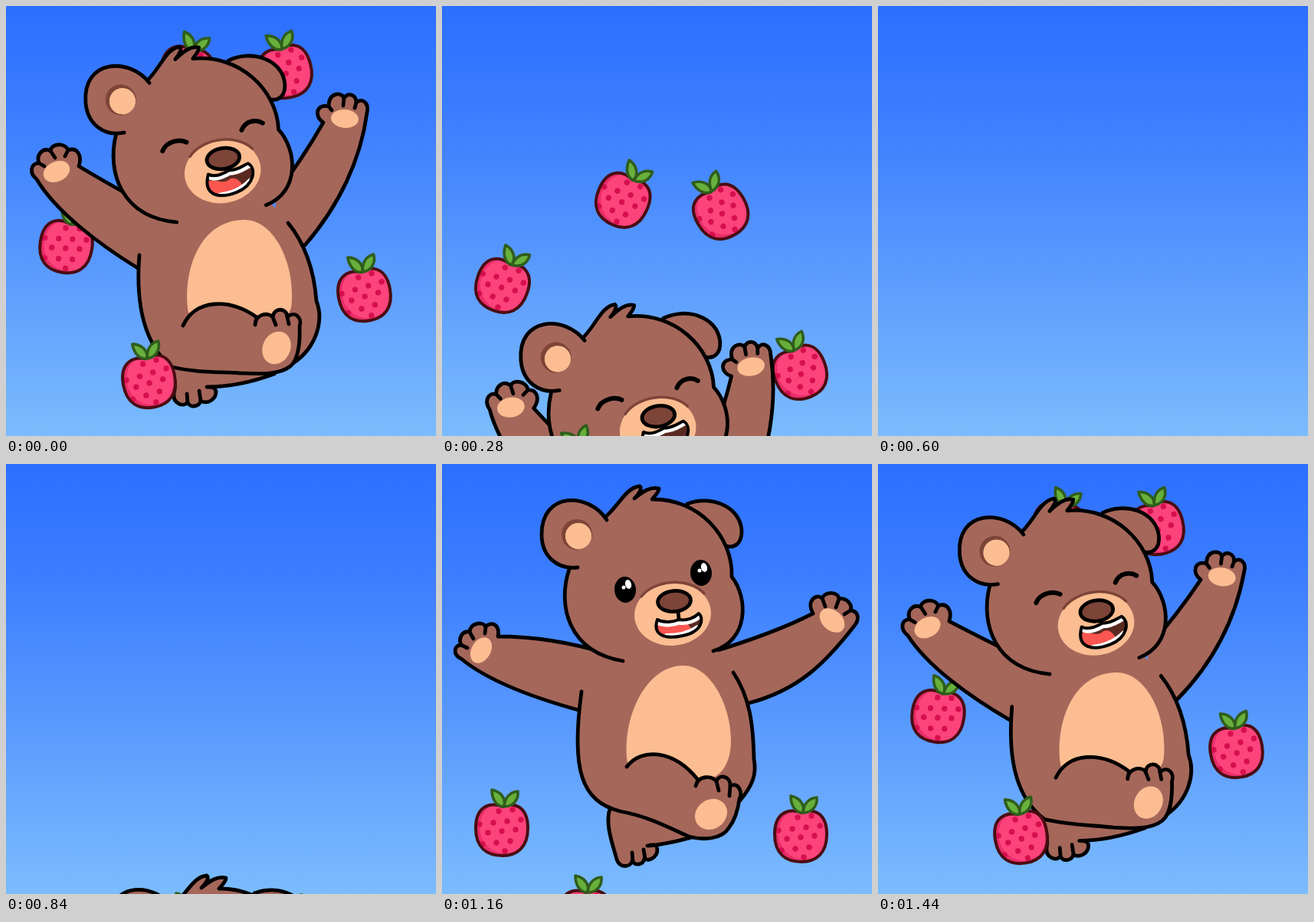
An HTML page with a canvas that plays this animation: 561 px wide and 561 px high, repeating every 1.52 s.

```html
<!DOCTYPE html>
<html lang="en">
<head>
<meta charset="utf-8">
<title>Jumping bear</title>
<style>
html, body { margin: 0; height: 100%; overflow: hidden; }
canvas { display: block; width: 100vw; height: 100vh; }
</style>
</head>
<body>
<canvas id="stage" width="561" height="561"></canvas>
<script>
const g = document.getElementById('stage').getContext('2d');
const LOOP = 1520, STEP = 40;
const FUR = '#a5675a', SKIN = '#fbbd91', DARK = '#7d4438', INK = '#000';
g.lineCap = g.lineJoin = 'round';

const sky = g.createLinearGradient(0, 0, 0, 561);
['#2c6fff', '#3b7dff', '#4f91fe', '#66a6fe', '#7bbcfd']
  .forEach((c, i) => sky.addColorStop(i / 4, c));

// Smooth monotone curve through [time, value] pairs
function curve(...keys) {
  const rate = i => (keys[i + 1][1] - keys[i][1]) / (keys[i + 1][0] - keys[i][0]);
  const last = keys.length - 1;
  const slope = i => {
    if (i === 0) return rate(0);
    if (i === last) return rate(last - 1);
    const a = rate(i - 1), b = rate(i);
    return a * b > 0 ? 2 * a * b / (a + b) : 0;
  };
  return t => {
    if (t <= keys[0][0]) return keys[0][1];
    if (t >= keys[last][0]) return keys[last][1];
    const i = keys.findIndex(k => k[0] > t) - 1;
    const [t0, y0] = keys[i], [t1, y1] = keys[i + 1];
    const h = t1 - t0, u = (t - t0) / h, v = 1 - u;
    return v * v * (1 + 2 * u) * y0 + u * u * (3 - 2 * u) * y1
      + h * u * v * (v * slope(i) - u * slope(i + 1));
  };
}

const bearX = curve([840, 4], [1000, 2], [1160, 0], [1520, 0], [1680, -1]);
const bearY = curve([840, 508], [1000, 234], [1160, 0], [1300, -5], [1440, -5.5],
  [1520, 0], [1680, 107], [1960, 760]);
const poseAt = curve([1160, 0], [1300, .55], [1440, .9], [1520, 1]);
const liftAt = curve([840, -.2], [1000, -.15], [1160, 0], [1520, 0], [1680, .18], [1960, .4]);
const spinAt = curve([1160, 0], [1440, .25], [1520, .27], [1680, .35], [1960, 1], [2120, 1.5]);

const berryPath = (...ys) =>
  curve(...[840, 1000, 1160, 1440, 1520, 1680, 1960, 2120].map((t, i) => [t, ys[i]]));
const berries = [
  { x: 78, spin: 34, y: berryPath(660, 567, 478, 330, 315, 314, 503, 640) },
  { x: 235, spin: 42, y: berryPath(613, 505, 300, 85, 88, 130, 519, 800) },
  { x: 365, spin: -54, y: berryPath(613, 505, 290, 85, 87, 128, 563, 820) },
  { x: 468, spin: -38, y: berryPath(650, 568, 486, 376, 378, 417, 602, 780) },
  { x: 187, spin: -38, y: berryPath(720, 670, 590, 488, 491, 539, 720, 900) }
];

const number = /-?[\d.]+/g;
let pose = 0;
const lerp = (a, b) => a + pose * (b - a);

// Blend two path strings of equal structure by the current pose
function mix([a, b]) {
  const to = b.match(number);
  let i = 0;
  return new Path2D(a.replace(number, v => lerp(+v, +to[i++]).toFixed(2)));
}

function paint(path, fill, line, width = 4.8) {
  const p = typeof path === 'string' ? new Path2D(path) : path;
  if (fill) { g.fillStyle = fill; g.fill(p); }
  if (line) { g.strokeStyle = line; g.lineWidth = width; g.stroke(p); }
}

function oval(x, y, rx, ry, deg, fill, line) {
  const p = new Path2D();
  p.ellipse(x, y, rx, ry, deg * Math.PI / 180, 0, 7);
  paint(p, fill, line);
}

const pad = (a, b) => oval(...a.map((v, i) => lerp(v, b[i])), SKIN);

function turn(x, y, angle) {
  g.translate(x, y);
  g.rotate(angle);
  g.translate(-x, -y);
}

// Each part: open pose, then raised pose
const farLeg = [
  'M219 450C212 470 224 500 228 516C232 528 246 526 248 518C252 524 262 524 264 515C272 520 284 510 280 499C279 497 275 496 268 498C290 497 310 491 330 486L300 440',
  'M214 470C220 480 222 495 219 505C217 519 232 524 237 517C240 525 252 523 254 515C262 520 274 514 274 503C273 498 270 497 262 497C290 497 320 491 350 480L300 440'];
const farToes = ['M248 507L249 519M263 503L265 515', 'M236 506L237 518M252 502L254 515'];
const leftArm = [
  'M215 247C165 232 115 225 73 225C76 211 66 204 57 212C53 205 37 207 36 219C26 217 21 228 25 236C14 237 15 250 25 254C60 283 120 305 178 321L215 300',
  'M190 262C160 247 125 227 95 209C100 194 92 184 81 188C77 178 59 179 58 189C48 184 39 194 43 205C32 205 30 218 40 226C65 268 120 310 172 342L215 320'];
const leftFingers = ['M57 212L56 221M36 219L41 228M25 236L33 240', 'M81 188L77 196M58 189L64 198M43 205L50 209'];
const rightArm = [
  'M350 246C400 231 445 215 484 195C475 180 487 168 496 175C500 166 517 166 518 176C528 174 536 184 533 191C545 192 544 204 538 211C500 260 465 295 400 312L360 310',
  'M352 246C375 215 395 185 414 152C402 145 404 127 421 131C421 112 438 112 441 120C447 112 457 116 457 126C465 119 474 127 471 139C463 200 435 260 390 312L350 310'];
const rightFingers = ['M496 175L500 186M518 176L514 187M533 191L525 196', 'M421 131L425 136M441 120L440 130M457 126L455 133'];
const body = [
  'M182 297C168 400 182 440 232 453L322 486L388 440C405 420 411 405 407 385C406 340 402 305 380 272L345 225L205 225Z',
  'M174 325C168 400 185 445 216 471L305 479L376 465C405 445 415 410 405 385C402 345 390 310 368 283L335 245L190 245Z'];
const flank = [
  'M380 272C402 305 406 340 407 385C411 405 405 420 388 440',
  'M368 283C390 310 402 345 405 385C415 410 405 445 376 465'];
const belly = [
  'M314 263C350 262 377 315 377 360C377 390 365 408 345 412L243 395C232 340 262 264 314 263Z',
  'M310 279C348 278 373 330 373 375C373 400 372 402 350 412L238 400C230 350 250 280 310 279Z'];
const leg = [
  'M241 395C260 370 302 372 334 412L331 420C334 406 352 406 358 414C362 403 377 408 376 420C386 414 393 428 388 437C386 452 382 465 374 475C365 490 340 491 322 486C295 474 270 460 232 453C182 440 168 400 182 297',
  'M231 417C246 383 290 380 327 406L325 416C325 403 341 398 348 406C350 392 367 394 367 406C376 397 387 406 383 418C384 440 381 462 371 470C355 482 330 480 305 479C280 477 250 479 216 471C185 445 168 400 174 325'];
const toes = ['M358 414L361 426M376 420L375 433', 'M348 406L352 416M367 406L369 415'];
const mouth = [
  'M281 203C290 208 302 206 309 203C320 205 330 200 335 195C342 201 340 219 314 224C292 229 274 224 281 203Z',
  'M282 198C290 203 301 199 309 195C322 196 330 189 335 188C346 196 340 217 318 224C296 231 272 227 282 198Z'];
const upperTeeth = [
  'M282 203C290 208 302 206 309 203C320 205 330 200 335 195',
  'M283 198C290 203 301 199 309 195C322 196 330 189 335 188'];
const lowerTeeth = ['M293 226Q318 226 334 215', 'M296 228Q320 227 337 212'];
const cheek = 'M236 257C165 245 150 185 166 137';
const crown = 'M212 70C230 56 240 30 258 29C262 32 256 40 251 45C262 36 272 29 283 32C283 37 278 41 274 46C335 45 380 95 378 147C400 175 400 230 354 244';

function berry({ x, spin, y }, t) {
  g.save();
  g.translate(x, y(t));
  g.rotate(spin * spinAt(t) * Math.PI / 180);
  const skin = new Path2D('M1 -31C14 -37 34 -33 34 -3C34 22 20 33 1 33C-20 33 -34 22 -34 -3C-34 -33 -14 -37 1 -31Z');
  g.save();
  g.clip(skin);
  paint(skin, '#ea2c68');
  oval(4, -4, 33, 34, 0, '#fc437c');
  for (let r = -2; r <= 2; r++)
    for (let c = -2; c <= 2; c++) {
      const dx = c * 18 + (r & 1) * 9 + r * 2, dy = r * 13 - c * 2 + 1;
      if (Math.hypot(dx, dy) < 31) oval(dx, dy, 3.7, 3.7, 0, '#d60f4e');
    }
  g.restore();
  paint(skin, null, '#4a0d12', 4);
  for (const leaf of ['M3 -31C-8 -31 -13 -42 -13 -53C-2 -51 6 -42 3 -31Z', 'M3 -31C4 -42 10 -50 21 -51C22 -41 16 -31 3 -31Z'])
    paint(leaf, '#68b03c', '#2f5d1c', 3.6);
  g.restore();
}

function arm(shape, fingers, pads, x, y, angle) {
  g.save();
  turn(x, y, angle);
  paint(mix(shape), FUR, INK);
  pad(...pads);
  paint(mix(fingers), null, INK);
  g.restore();
}

function head(laughing) {
  g.save();
  g.translate(-14 * pose, 20 * pose);
  turn(300, 250, -.08 * pose);
  paint('M320 52C350 40 390 55 391 88C391 105 380 110 371 107', FUR, INK);
  paint(cheek + crown.replace('M', 'L'), FUR);
  paint(cheek, null, INK);
  paint(crown, null, INK);
  paint('M215 73C192 37 130 35 130 92C130 120 150 138 177 135', FUR, INK);
  oval(176, 92, 20, 20, 0, DARK);
  oval(178, 94, 17, 17, 0, SKIN);
  paint('M176 112L198 96L204 112Z', FUR);
  oval(178, 94, 17, 17, 0, SKIN);

  oval(301, 196, 50, 41, -5, SKIN);
  paint('M260 173C277 151 322 147 342 169', null, DARK, 3.5);
  if (laughing) {
    paint('M225 163C231 150 249 149 257 154', null, INK, 6);
    paint('M330 144C336 132 350 131 358 137', null, INK, 6);
  } else {
    for (const [x, y] of [[239, 164], [338, 142]]) {
      oval(x, y, 14, 17, -5, INK);
      oval(x + 4, y - 7, 4, 6, -15, '#fff');
      oval(x - 2, y - 3, 2.5, 2.5, 0, '#fff');
    }
  }
  paint('M308 193L309 202', null, INK);
  const lips = mix(mouth);
  g.save();
  g.clip(lips);
  paint(lips, '#5a2a22');
  paint('M276 208C292 202 300 215 310 206C318 204 324 210 328 222L300 232L276 228Z', '#fb5650');
  paint(mix(upperTeeth), null, '#fff', 13);
  paint(mix(lowerTeeth), null, '#fff', 10);
  g.restore();
  paint(lips, null, INK, 4);
  oval(303, 179, 21.5, 13.5, -5, DARK, INK);
  g.restore();
}

function bear(t) {
  pose = poseAt(t);
  const lift = liftAt(t);
  g.save();
  g.translate(bearX(t), bearY(t));
  paint(mix(farLeg), FUR, INK);
  paint(mix(farToes), null, INK);
  arm(leftArm, leftFingers, [[51, 243, 18, 12.5, -60], [66, 216, 18, 13, -25]], 180, 290, lift);
  arm(rightArm, rightFingers, [[509, 204, 18.5, 13, 42], [442, 147, 18, 12, 5]], 378, 275, -lift);
  paint(mix(body), FUR);
  paint(mix(belly), SKIN);
  paint(mix(flank), null, INK);
  paint(mix(leg), FUR, INK);
  paint(mix(toes), null, INK);
  pad([351, 457, 22, 19, -35], [353, 446, 22, 18, -65]);
  head(t > 1280);
  g.restore();
}

function draw(now) {
  let t = Math.floor(now % LOOP / STEP) * STEP;
  if (t === 480 || t === 1480) t -= STEP; // held poses
  if (t < 840) t += LOOP;
  g.fillStyle = sky;
  g.fillRect(0, 0, 561, 561);
  berries.slice(0, 4).forEach(b => berry(b, t));
  bear(t);
  berry(berries[4], t);
}

const start = performance.now();
function tick() {
  draw(performance.now() - start);
  requestAnimationFrame(tick);
}
tick();
</script>
</body>
</html>
```
